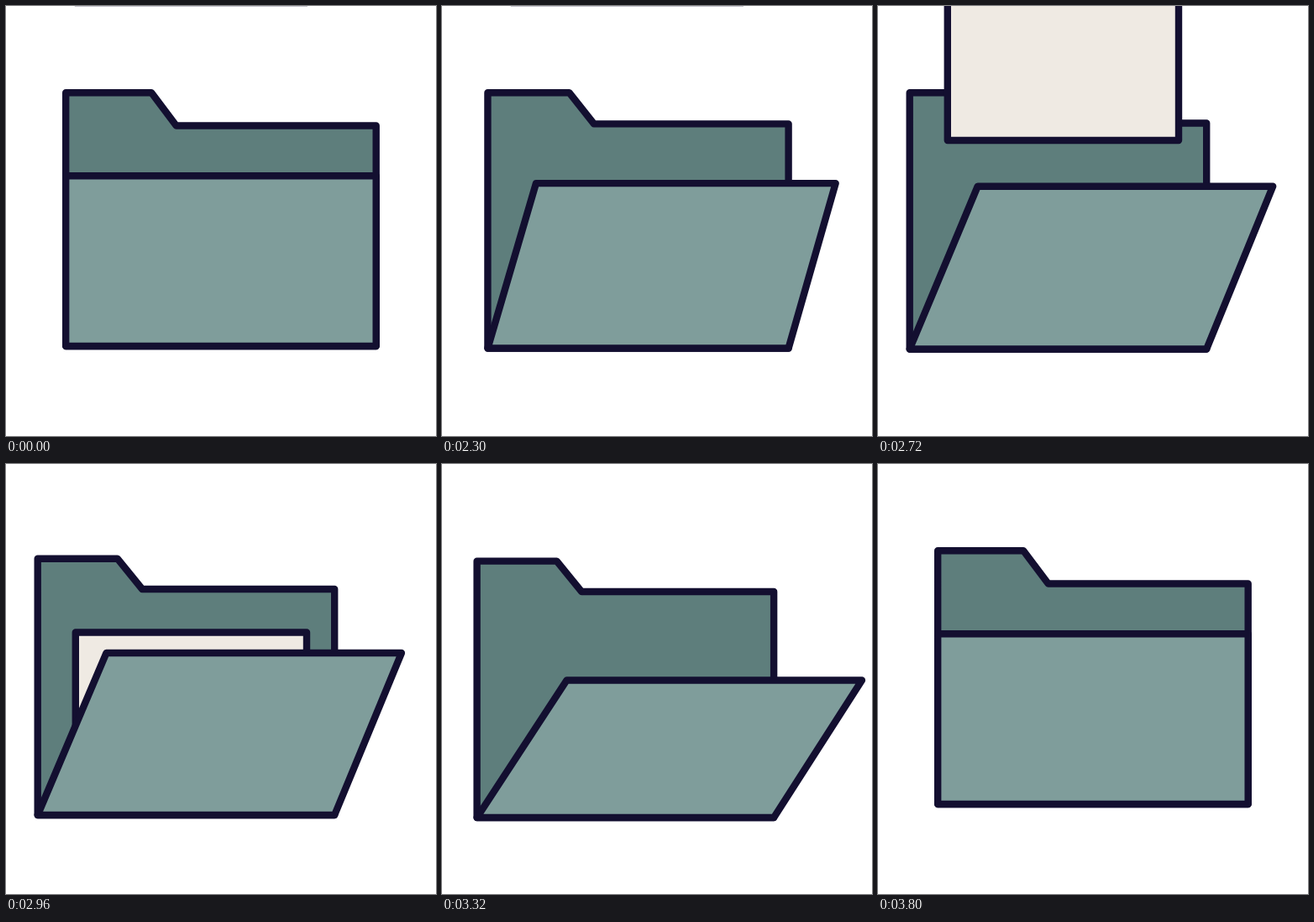
An HTML page for the animation above (3830 ms loop, 512 px wide and 512 px high).

```html
<!DOCTYPE html>
<html lang="en">
<head>
<meta charset="utf-8">
<title>Folder</title>
<style>
  html, body { margin: 0; height: 100%; overflow: hidden; background: #fff; }
  svg { display: block; width: 100%; height: 100%; }
  polygon { stroke: #130f30; stroke-width: 8.4; stroke-linejoin: round; }
</style>
</head>
<body>
<svg viewBox="0 0 512 512">
  <clipPath id="inside"><rect id="mask" width="512" height="512"/></clipPath>
  <polygon id="back" fill="#5e7e7c"/>
  <g clip-path="url(#inside)"><polygon id="paper" fill="#efeae3"/></g>
  <polygon id="front" fill="#7f9d9b"/>
</svg>
<script>
const LOOP = 3830, STEP = 30;
const el = id => document.getElementById(id);
const back = el('back'), paper = el('paper'), front = el('front'), mask = el('mask');

const progress = (t, from, to) => Math.min(1, Math.max(0, (t - from) / (to - from)));
const smooth = (t, from, to) => (1 - Math.cos(Math.PI * progress(t, from, to))) / 2;
const easeOut = (t, from, to) => Math.sin(Math.PI / 2 * progress(t, from, to));
const setPoints = (shape, points) => shape.setAttribute('points', points.join(' '));

function draw(t) {
  const stay = 1 - smooth(t, 3330, 3780);
  const open = easeOut(t, 2010, 2587) * stay;
  const wide = smooth(t, 2915, 3340) * stay; // front flap thrown further open
  const shift = smooth(t, 2030, 2570) - smooth(t, 3180, 3810);
  const dy = 31.5 * smooth(t, 2866, 3120) - 37.5 * smooth(t, 3120, 3516) + 6 * smooth(t, 3516, 3800);

  const left = 71.2 - 33.5 * shift;
  const right = left + 369.5 - 16 * open;
  const top = 103.2 + dy;
  const shoulder = 142.5 - 3 * open + dy;
  const bottom = 405 + 3.5 * open + dy;
  setPoints(back, [
    [left, top], [left + 102 - 7 * open, top],
    [left + 131.5 - 7 * open, shoulder], [right, shoulder],
    [right, bottom], [left, bottom]
  ]);

  const lip = 202.3 + 12.4 * open + 30.5 * wide + dy;
  setPoints(front, [
    [left + 81 * open + 26 * wide, lip], [right + 79 * open + 26 * wide, lip],
    [right, bottom], [left, bottom]
  ]);

  // The sheet accelerates into the folder and is cut off at its base.
  const fall = Math.max(0, t - 2540);
  const sheet = -304 + 0.693 * fall + 0.00121 * fall * fall;
  setPoints(paper, [[82.8, sheet], [358, sheet], [358, sheet + 300], [82.8, sheet + 300]]);
  mask.setAttribute('height', bottom);
}

function tick() {
  const t = performance.now() % LOOP;
  draw(Math.max(0, t - (t + 10) % STEP));
  requestAnimationFrame(tick);
}
tick();
</script>
</body>
</html>
```
